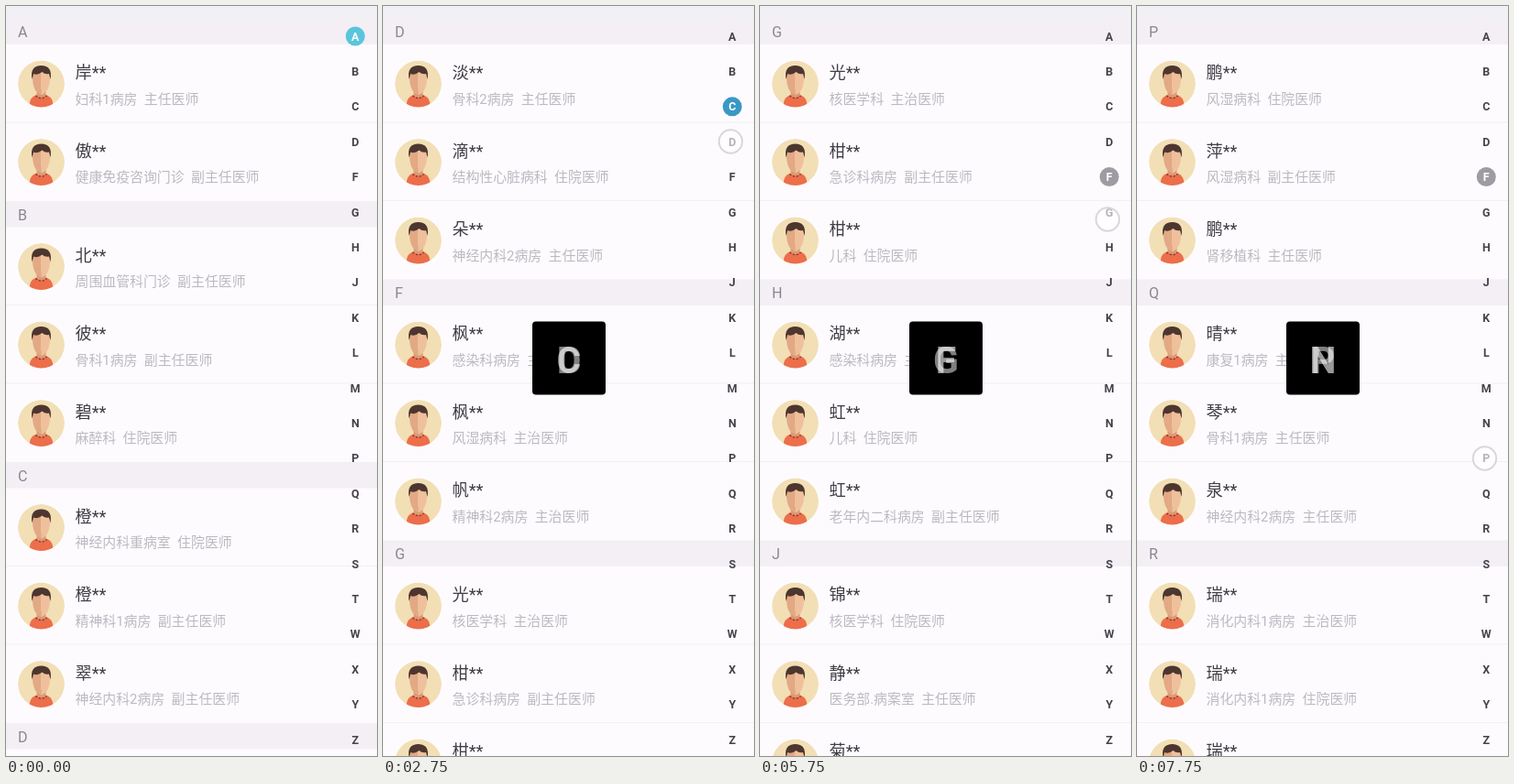
An HTML page that plays this animation: 405x819 px, repeating every 8000 ms.

```html
<!DOCTYPE html>
<html lang="zh-CN">
<head>
<meta charset="utf-8">
<title>医师列表</title>
<style>
html, body { margin: 0; width: 100%; height: 100%; overflow: hidden; background: #fefbff; }
svg { display: block; width: 405px; height: 819px; font-family: Roboto, "Noto Sans CJK SC", "Noto Sans CJK", sans-serif; }
.head { font-size: 16px; fill: #8b8790; }
.name { font-size: 18.2px; fill: #413d45; }
.info { font-size: 14.9px; fill: #bdb8c1; }
.index text { font: 700 12.5px Roboto, sans-serif; fill: #47434b; text-anchor: middle; }
.index .on { fill: #fff; }
.toast text { font: 700 41px Roboto, sans-serif; fill: #fff; text-anchor: middle; }
</style>
</head>
<body>
<svg viewBox="0 0 405 819">
  <defs>
    <clipPath id="disc"><circle r="25.5"/></clipPath>
    <g id="avatar" clip-path="url(#disc)">
      <circle r="25.5" fill="#f2dfb5"/>
      <path d="M-13 26C-13 16-10 14-5 12H5C10 14 13 16 13 26Z" fill="#ec6e4b"/>
      <path d="M-5 6H5V13Q0 17-5 13Z" fill="#d99a76"/>
      <path d="M0-19C-8-19-10-13-9.500-5C-9 5-5 11 0 12Z" fill="#e2a984"/>
      <path d="M0-19C8-19 10-13 9.500-5C9 5 5 11 0 12Z" fill="#efc09b"/>
      <path d="M-10-5C-12-15-8-20 0-20C8-20 12-15 10-5L8.500-11Q4-10 1-13Q-4-9-8.500-11Z" fill="#4c362f"/>
      <path d="M-6 13Q0 18.500 6 13" fill="none" stroke="#7c332b" stroke-width="1.300" stroke-dasharray="2 2"/>
    </g>
  </defs>
  <rect width="405" height="819" fill="#fefbff"/>
  <g id="list"></g>
  <rect width="405" height="13.500" fill="#f0f0f5"/>
  <g class="index" id="index"></g>
  <circle id="ring" cx="379.500" r="12.700" fill="#fff" fill-opacity=".6" stroke="#dad6de" stroke-width="2"/>
  <g class="toast" id="toast">
    <rect x="163" y="344.500" width="80" height="80" rx="4"/>
    <text id="prev" x="203" y="400.500"/>
    <text id="cur" x="203" y="400.500"/>
  </g>
</svg>
<script>
const HEAD = 28.5, ROW = 85.5, TOP = 13.5, STEP = 38.4;
const LETTERS = 'ABCDFGHJKLMNPQRSTWXYZ';
const ACTIVE = { A: '#59c5dc', C: '#3a98c5', F: '#9e9ba3' };

// name, department, rank
const STAFF = {
  A: '岸 妇科1病房 主任,傲 健康免疫咨询门诊 副主任',
  B: '北 周围血管科门诊 副主任,彼 骨科1病房 副主任,碧 麻醉科 住院',
  C: '橙 神经内科重病室 住院,橙 精神科1病房 副主任,翠 神经内科2病房 副主任',
  D: '淡 骨科2病房 主任,滴 结构性心脏病科 住院,朵 神经内科2病房 主任',
  F: '枫 感染科病房 主任,枫 风湿病科 主治,帆 精神科2病房 主治',
  G: '光 核医学科 主治,柑 急诊科病房 副主任,柑 儿科 住院',
  H: '湖 感染科病房 主任,虹 儿科 住院,虹 老年内二科病房 副主任',
  J: '锦 核医学科 住院,静 医务部.病案室 主任,菊 麻醉科 主治',
  K: '葵 儿科 主治,空 骨科1病房 住院,恺 急诊科病房 主任',
  L: '岚 呼吸内科RCU 主治,露 内分泌代谢科病房 主治,岚 血液内科1病房 主治',
  M: '梦 肿瘤放疗2病房 主治,墨 老年内一科病房 住院,棉 急诊科病房 主治',
  N: '暖 心血管内科3病房 住院,柠 乳腺外科病房 住院,柠 儿科 主治',
  P: '鹏 风湿病科 住院,萍 风湿病科 副主任,鹏 肾移植科 主任',
  Q: '晴 康复1病房 主任,琴 骨科1病房 主任,泉 神经内科2病房 主任',
  R: '瑞 消化内科1病房 主治,瑞 消化内科1病房 住院,瑞 消化内科1病房 主治'
};

// time, list section, active letter, touch y, toast letter, fading letter, toast opacity
const STATES = [
  [0, 'A', 'A'],
  [250, 'A', 'A', 36, 'A'],
  [1000, 'A', 'A', 34, 'A'],
  [1250, 'B', 'A', 72, 'B', 'A'],
  [1500, 'C', 'A', 110, 'C', 'B'],
  [1750, 'C', 'C', 0, 'C'],
  [2250, 'C', 'C', 110, 'C'],
  [2500, 'C', 'C', 116, 'C'],
  [2750, 'D', 'C', 148, 'D', 'C'],
  [3000, 'D', 'C', 164, 'D'],
  [3250, 'F', 'C', 186, 'F', 'D'],
  [3500, 'F', 'F', 0, 'F'],
  [4750, 'F', 'F', 0, 'F', '', .5],
  [5000, 'F', 'F'],
  [5500, 'F', 'F', 192, 'F'],
  [5750, 'G', 'F', 233, 'G', 'F'],
  [6000, 'H', 'F', 268, 'H', 'G'],
  [6250, 'J', 'F', 305, 'J', 'H'],
  [6500, 'K', 'F', 343, 'K', 'J'],
  [6750, 'L', 'F', 385, 'L', 'K'],
  [7000, 'M', 'F', 417, 'M', 'L'],
  [7250, 'N', 'F', 452, 'N', 'M'],
  [7500, 'N', 'F', 470, 'N'],
  [7750, 'P', 'F', 494, 'P', 'N']
];

const $ = id => document.getElementById(id);
const list = $('list'), index = $('index'), ring = $('ring');
const toast = $('toast'), cur = $('cur'), prev = $('prev');

function add(parent, tag, attrs, text = '') {
  const el = document.createElementNS('http://www.w3.org/2000/svg', tag);
  for (const k in attrs) el.setAttribute(k, attrs[k]);
  el.textContent = text;
  return parent.appendChild(el);
}

const offset = {};
let y = TOP;
for (const letter in STAFF) {
  offset[letter] = y - TOP;
  add(list, 'rect', { y, width: 405, height: HEAD, fill: '#f3eff4' });
  add(list, 'text', { x: 13, y: y + 20.8, class: 'head' }, letter);
  y += HEAD;
  STAFF[letter].split(',').forEach((entry, i) => {
    const [name, dept, rank] = entry.split(' ');
    if (i) add(list, 'rect', { y: y - 1, width: 405, height: 1, fill: '#f3f0f4' });
    add(list, 'use', { href: '#avatar', x: 38.5, y: y + 43 });
    add(list, 'text', { x: 75.5, y: y + 37.3, class: 'name' }, name + '**');
    add(list, 'text', { x: 75.5, y: y + 64.7, class: 'info' }, `${dept}\u00a0\u00a0${rank}医师`);
    y += ROW;
  });
}

const dot = add(index, 'circle', { cx: 381.3, r: 10.5 });
const marks = [...LETTERS].map((c, i) =>
  add(index, 'text', { x: 381.3, y: 37.6 + i * STEP }, c));

let shown;
function show(state) {
  if (state === shown) return;
  shown = state;
  const [, section, active, touch, letter, old, alpha = 1] = state;
  const at = LETTERS.indexOf(active);
  list.setAttribute('transform', `translate(0 ${-offset[section]})`);
  dot.setAttribute('cy', 33 + at * STEP);
  dot.setAttribute('fill', ACTIVE[active]);
  marks.forEach((m, i) => m.classList.toggle('on', i === at));
  ring.style.display = touch ? '' : 'none';
  ring.setAttribute('cy', touch || 0);
  toast.style.display = letter ? '' : 'none';
  toast.style.opacity = alpha;
  cur.textContent = letter || '';
  prev.textContent = old || '';
  cur.style.opacity = old ? .5 : 1;
  prev.style.opacity = .6;
}

const start = performance.now();
function tick() {
  const t = (performance.now() - start) % 8000;
  show(STATES.findLast(s => s[0] <= t));
  requestAnimationFrame(tick);
}
tick();
</script>
</body>
</html>
```
